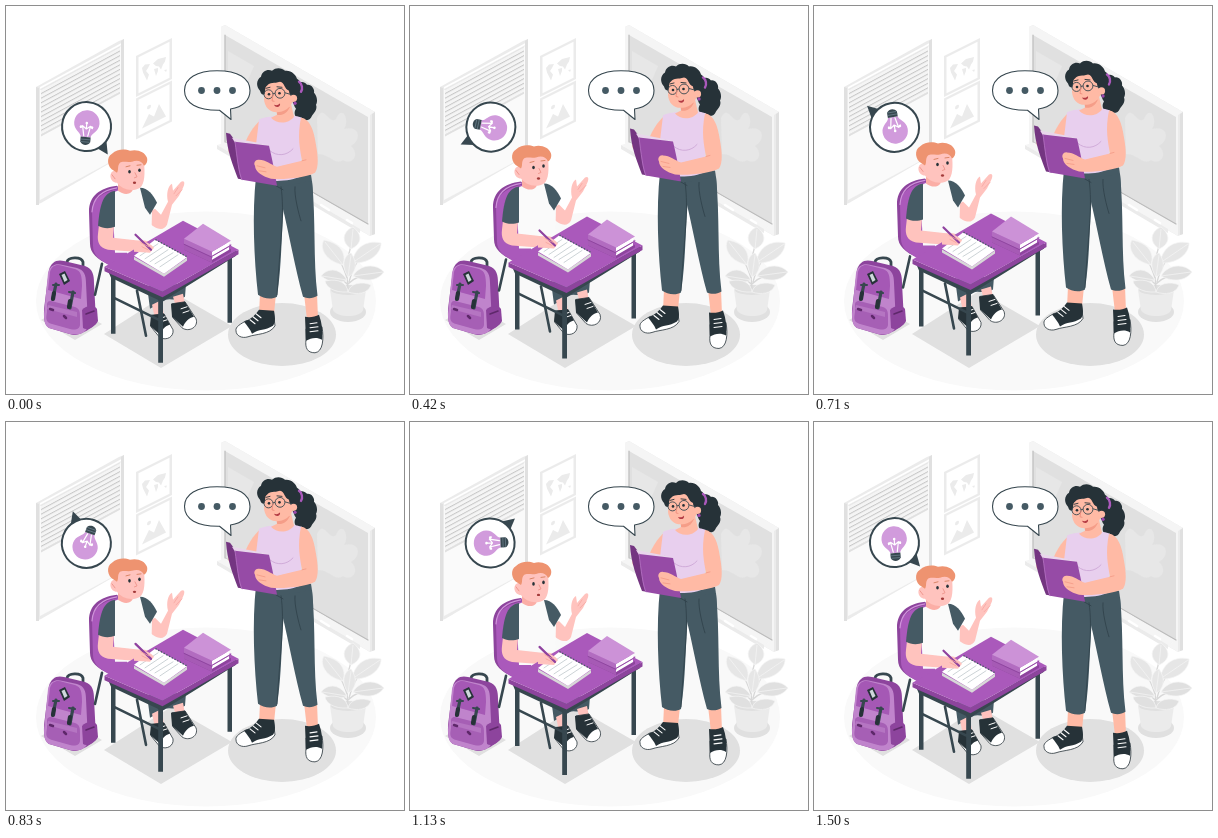
An HTML page for the animation above (1540 ms loop, 398 px wide and 388 px high).

```html
<!DOCTYPE html>
<html lang="en">
<head>
<meta charset="utf-8">
<title>Tutoring scene</title>
<style>
@property --p { syntax: "<number>"; inherits: true; initial-value: 0; }
html, body { margin: 0; width: 100%; height: 100%; overflow: hidden; background: #fff; }
svg { display: block; width: 398px; height: 388px; animation: tick 1540ms steps(37) -4ms infinite; }
@keyframes tick { from { --p: .0135; } to { --p: 1.0135; } }
.spin { transform: rotate(calc(360deg * var(--p))); }
.bob { transform: translateY(calc(-16px * min(var(--p), 1 - var(--p)))); }
.line { fill: none; stroke-linecap: round; stroke-linejoin: round; }
.ink { fill: #263238; } .slate { fill: #455a64; } .white { fill: #fff; }
.purple { fill: #aa59bb; } .deep { fill: #8d449d; } .lilac { fill: #cc92d7; }
.tan { fill: #ffbaa5; } .pink { fill: #ffc3be; }
.g1 { fill: #f5f5f5; } .g2 { fill: #ebebeb; } .g3 { fill: #e0e0e0; }
</style>
</head>
<body>
<svg viewBox="0 0 398 388">
<defs>
  <pattern id="slats" width="82" height="4.600" patternUnits="userSpaceOnUse">
    <path class="g1" d="M0 0H82V5H0z"/><path fill="#c8c8c8" d="M0 0H82V1.200H0z"/>
  </pattern>
  <g id="sneaker">
    <path class="white" stroke="#263238" stroke-width=".8" d="M-20 13C-21 9-15 6-10 3L18 0 19 8C14 17 0 16-8 19-14 21-20 18-20 13z"/>
    <path class="ink" d="M-12 4C-4 1 0-4 3-8L18-7C19-2 20 4 17 8 9 13 3 11-4 16-6 11-9 8-12 4z"/>
    <path class="line" stroke="#fff" stroke-width="1.100" d="M-6 2L-1 6M-3-1L2 3M0-4L5 0"/>
  </g>
</defs>

<ellipse cx="200" cy="295" rx="170" ry="89.500" fill="#f9f9f9"/>

<!-- window -->
<path class="g2" d="M30 81L113 35 118 33V149L35 197 30 199z"/>
<path class="g3" d="M30 81L33 82V199L30 199zM115 35L118 33V149L115 150z"/>
<g transform="matrix(1 -.54 0 1 34 83)">
  <path fill="#fafafa" d="M0 1H81V111H0z"/>
  <path fill="url(#slats)" d="M1 1H80V46H1z"/>
  <path class="g3" d="M1 46H80V48H1z"/>
  <path class="white" d="M0-2H81V0H0z"/>
</g>

<!-- pictures -->
<g transform="matrix(1 -.5 0 1 130 50)">
  <path class="g2" d="M0 0H36V41H0z"/><path class="white" d="M2.500 2.500H33.500V38.500H2.500z"/>
  <path class="g2" d="M6 15L9 13 14 15 12 18 10 20 13 25 11 30 9 25 7 20zM17 16L22 14 30 16 29 20 27 22 25 26 23 22 20 20zM18 22L22 23 22 26 20 30zM28 28L31 29 30 31z"/>
</g>
<g transform="matrix(1 -.5 0 1 130 92.500)">
  <path class="g2" d="M0 0H36V41H0z"/><path class="white" d="M2.500 2.500H33.500V38.500H2.500z"/>
  <path class="g2" d="M6 33L13 22 18 27 23 17 30 33z"/><circle class="g2" cx="13" cy="15" r="2"/>
</g>

<!-- board -->
<path class="g2" d="M215 21L219 19 369 106V228L364 230 215 144z"/>
<path class="g1" d="M215 21L219 19 369 106 364 109V230L215 144z"/>
<path fill="#e0e0e0" d="M219 29L362 111V218L219 136z"/>
<path fill="#e7e7e7" d="M311 112C318 97 323 120 330 113 337 97 344 116 338 123 354 119 356 134 345 140 355 149 345 160 337 154 329 160 324 148 312 148zM222 45L248 60 239 81 229 73 222 83z"/>
<path class="line" stroke="#bcbcbc" stroke-width="1.200" d="M219 29V136L362 218"/>
<path class="g3" d="M366 108L369 106V228L366 229z"/>
<path class="g1" d="M211 139L220 136.500 361 219 354 223z"/>
<path class="g2" d="M211 139L354 223V227L211 143z"/>
<path class="line" stroke="#fff" stroke-width="2.500" d="M315 199L323 204M341 214L346 217"/>

<!-- plant -->
<ellipse class="g3" cx="342" cy="306" rx="18" ry="10"/>
<path class="g2" d="M324 284C324 277 360 277 360 284L357 304C354 312 331 312 327 304z"/>
<ellipse class="g3" cx="342" cy="284" rx="17" ry="5"/>
<path class="line" stroke="#d8d8d8" stroke-width="1.300" d="M342 284Q339 257 346 236M341 272Q333 248 323 242M343 276Q350 250 366 242M342 278Q354 267 369 267M341 278Q331 267 321 268"/>
<g fill="#e6e6e6" stroke="#f5f5f5" stroke-width=".7">
  <path d="M345 243C333 234 339 224 347 221 357 229 356 238 345 243zM345 243L347 223"/>
  <path d="M337 259C316 254 314 239 318 234 334 237 341 247 337 259zM337 259L319 236"/>
  <path d="M346 257C349 239 363 234 375 237 375 250 360 258 346 257zM346 257L374 238"/>
  <path class="g3" d="M347 270C354 258 370 257 378 266 370 277 356 275 347 270zM347 270L377 266"/>
  <path class="g3" d="M341 274C334 262 322 261 315 270 324 277 333 278 341 274zM341 274L316 270"/>
  <path d="M342 271C334 258 339 249 345 247 352 257 350 267 342 271zM342 271L345 249"/>
  <path class="g3" d="M342 286C328 287 320 281 319 275 333 272 341 277 342 286zM342 286C344 277 356 275 365 279 362 288 351 289 342 286z"/>
</g>

<!-- floor shadows -->
<ellipse class="g3" cx="276" cy="328.500" rx="54" ry="31.500"/>
<path class="g3" d="M98 328L165 285 226 320 155 362z"/>
<path class="g3" d="M35 314L62 299 96 318 69 334z"/>

<!-- backpack -->
<g>
  <path class="line" stroke="#37474f" stroke-width="2.800" d="M61 262V256C62 251 75 250 77 256V263"/>
  <path class="deep" d="M43 264C45 256 51 253 58 255L79 260C87 263 88 269 88 277L90 315C90 321 73 330 67 329L43 322C37 318 38 309 38 303z"/>
  <path fill="#c084cc" d="M42 267C44 259 50 257 57 259L71 262C78 264 80 269 80 277L82 318C82 327 72 330 64 328L43 322C39 320 38 315 38 308z"/>
  <path fill="#a558b5" d="M44 266C46 259 51 258 57 260L69 263C75 265 76 270 76 280L75 293 42 284z"/>
  <path fill="#a65fb5" d="M41 298C42 294 45 295 49 296L69 301C74 303 74 306 74 312V319C73 324 69 324 64 323L46 318C39 316 40 312 41 306z"/>
  <path fill="#b575c2" d="M42 299L71 306V311L41 303z"/>
  <path class="deep" d="M76 304C80 299 89 299 91 303L92 315C89 321 81 325 77 322z"/>
  <path class="line" stroke="#37474f" stroke-width="3.200" d="M50 278L47 292M67 286L64 302"/>
  <path class="line" stroke="#263238" stroke-width="4.200" d="M48 287L47 293M64 295L63 301"/>
  <path class="line" stroke="#37474f" stroke-width="2" d="M47 279L53 279M63 286L69 287"/>
  <path class="line" stroke="#5e286a" stroke-width="1.600" d="M80 308L88 305"/>
  <path class="ink" d="M53 268L59 265 64 275 58 279z"/><path fill="#cfd8dc" d="M55.500 269L58.500 267.500 61.500 274 58.500 276z"/>
  <path class="line" stroke="#5e286a" stroke-width="2.500" d="M44 303L47 304M58 310L60 312"/>
</g>

<!-- speech bubble -->
<path class="white" stroke="#37474f" stroke-width="1.100" stroke-linejoin="round" d="M211 64.700C232 64.700 244 72 244 84.500 244 94 237 101 224.500 103L225 113.500 213.500 104.200C191 104.500 178.500 97 178.500 84.500 178.500 72 191 64.700 211 64.700z"/>
<g class="slate"><circle cx="195.500" cy="84.500" r="3.400"/><circle cx="211" cy="84.500" r="3.400"/><circle cx="226.500" cy="84.500" r="3.400"/></g>

<!-- idea bubble -->
<g transform="translate(80.500 121)"><g class="spin">
  <path fill="#37474f" d="M12 20L23.500 25.500 21 12z"/>
  <circle class="white" cy="-.4" r="24.500" stroke="#37474f" stroke-width="2"/>
  <path fill="#d19bdc" d="M-5 10C-5 6-12.700 4-12.700-4A12.700 12.700 0 0 1 12.700-4C12.700 4 5 6 5 10z"/>
  <path class="line" stroke="#fff" stroke-width="1.200" d="M-2 9L-4-1M2 9L4-1M-6 1L-4-1 0 2 4-1 6 1M0 2V-4"/>
  <g class="white"><circle cx="-5.500" cy="0" r="1.300"/><circle cx="5.500" cy="0" r="1.300"/><circle cy="-4" r="1.300"/></g>
  <path fill="#37474f" d="M-5 10H5V15C3 19-3 19-5 15z"/>
  <path stroke="#78909c" stroke-width=".6" d="M-5 12.500H5M-4.500 15H4.500"/>
</g></g>

<!-- boy at the desk -->
<g class="bob">
  <path class="line" stroke="#37474f" stroke-width="2.600" d="M96 258L89 289M131 285L140 330"/>
  <path class="deep" d="M83 206C83 190 94 182 111 180L117 187 103 200 104 259C91 254 84 247 84 238z"/>
  <path class="purple" d="M86 207C86 193 97 186 114 183L121 191V251L104 260C93 254 87 249 87 240z"/>
  <path class="line" stroke="#cf93da" stroke-width="1.200" d="M86 206C87 191 98 184 111 182"/>

  <path class="slate" d="M141 280L180 278 179 291C172 296 164 292 160 294L144 303z"/>
  <path class="pink" d="M146 299L156 294 158 311 149 313zM167 291L177 288 179 299 170 301z"/>
  <g>
    <path class="white" stroke="#263238" stroke-width=".8" d="M146 310L158 308 167 324C168 331 161 335 154 332L145 321z"/>
    <path class="ink" d="M145 309L158 308 164 319C159 320 156 324 154 329L144 320z"/>
    <path class="white" stroke="#263238" stroke-width=".8" d="M166 298L179 296 190 313C193 321 183 327 176 322L167 312z"/>
    <path class="ink" d="M165 298L179 296 188 311C183 312 179 316 177 321L166 311z"/>
    <path class="line" stroke="#fff" d="M153 313L159 311M155 316L161 314M175 303L181 301M177 307L183 305"/>
  </g>

  <path class="pink" d="M142 207L149 203 155 209 162 196C160 188 162 180 166 178L167 185 175 176C179 174 179 178 177 182L173 190 166 199 161 219C158 225 151 225 142 216z"/>
  <path class="line" stroke="#f5a39c" stroke-width=".7" d="M168 188L172 182M170 190L176 184"/>
  <path fill="#fafafa" d="M106 188C115 181 130 181 138 183L146 206 145 247 109 247z"/>
  <path class="slate" d="M134 182C142 182 147 189 151 197L144 209 139 202z"/>
  <path class="pink" d="M93 219L108 219 107 232 134 235C141 234 147 237 148 241 145 248 137 247 129 246L102 244C93 242 91 236 92 228z"/>
  <path class="slate" d="M109 185C98 187 94 196 92 220 97 223 104 223 109 221z"/>

  <path fill="#fbaea6" d="M112 176L127 182C127 189 118 190 112 185z"/>
  <path class="pink" d="M109 157C116 150 134 151 138 157 139 167 139 178 134 182 126 187 115 183 111 177 104 177 102 167 108 165z"/>
  <path fill="#ee9370" d="M111 167L108 165C101 162 100 151 106 148 111 143 119 143 124 145 131 143 139 146 141 152 142 156 140 159 138 160 136 155 131 154 126 156 121 157 117 155 114 157 111 160 113 164 111 167z"/>
  <g class="ink"><ellipse cx="123.500" cy="166" rx="1.300" ry="1.800"/><ellipse cx="133.500" cy="164.500" rx="1.300" ry="1.800"/></g>
  <path class="line" stroke="#d67f5f" stroke-width=".9" d="M120 161L124 160M131 159.500L135 159"/>
  <path class="line" stroke="#ee938b" stroke-width=".9" d="M129 167L131 171 128.500 172M106 169L109 173"/>
  <ellipse cx="128.500" cy="177" rx="1.600" ry="1.200" fill="#a33a3a"/>

  <path class="line" stroke="#37474f" stroke-width="2.500" d="M108 292L155 315"/>
  <path fill="#37474f" d="M102 265L156 288 230 244V250L156 296 105 272z"/>
  <path fill="#37474f" d="M105 267H109.500V328H105zM221.500 252H226V317H221.500zM152.200 288H157V357H152.200z"/>
  <path class="deep" d="M98.500 261L156.500 286 232.500 244V248.500L156.500 291.500 98.500 265.500z"/>
  <path class="purple" d="M98.500 261L177 215 232.500 244 156.500 286z"/>

  <path fill="#d8d8d8" d="M128 251L158 268 181 252V255L158 271 128 254z"/>
  <path class="white" d="M128 250L149 234 181 251.500 158 268z"/>
  <path class="line" stroke="#a9b5ba" stroke-width=".6" d="M134 250L152 238M139 253L157 241M144 256L162 244M149 258L167 247M154 261L172 249"/>
  <path class="line" stroke="#455a64" stroke-width="1.500" stroke-dasharray=".1 3" d="M150 234L181 251"/>
  <path class="pink" d="M128 236C135 233 144 237 148 242L144 247 128 246z"/>
  <path class="line" stroke="#8f429f" stroke-width="2.200" d="M129.500 229L145 244"/>
  <path class="line" stroke="#f5a39c" stroke-width=".8" d="M135 237L143 241M136 241L142 244"/>

  <path class="deep" d="M178 241L206 254 225 243V246L206 257 178 244z"/>
  <path class="white" d="M206 250L223 240V244L206 254z"/>
  <path fill="#a65ab5" d="M178 238L206 251V257L178 244z"/>
  <path class="lilac" d="M206 249L225 238V240L206 251z"/>
  <path class="white" d="M206 246L223 236V240L206 250z"/>
  <path fill="#b26cc0" d="M178 233L206 246V251L178 238z"/>
  <path class="lilac" d="M178 233L197 218 225 235 206 246z"/>
  <path class="line" stroke="#8d449d" stroke-width=".9" d="M206 250.500L225 239.500M178 238.500L206 251.500"/>
</g>

<!-- teacher -->
<g class="bob">
  <path class="ink" d="M289 84C291 76 297 74 301 79 305 78 309 83 308 87 311 90 312 96 310 99 312 104 307 108 306 110 304 116 297 115 295 112 289 114 287 107 290 103 286 98 287 90 289 84z"/>
  <path class="tan" d="M254 288L270 288 268 308 253 309zM298 288L311 288 312 313 301 314z"/>
  <use href="#sneaker" x="250" y="312"/>
  <path class="white" stroke="#263238" stroke-width=".8" d="M300 323L316 321C318 333 317 346 309 347 301 347 299 342 300 334z"/>
  <path class="ink" d="M299 311C304 312 309 311 313 309 316 317 317 326 316 334 311 331 305 332 300 335z"/>
  <path class="line" stroke="#fff" stroke-width="1.100" d="M304 318L311 317M304 322L312 321M304 326L312 325"/>

  <path class="slate" d="M250 171L305 169C307 181 307 189 307 201L299 205 278 198C275 231 276 258 271 291 266 294 257 293 252 289 248 253 246 207 250 171z"/>
  <path class="slate" d="M274 181L306 175C310 216 307 253 311.500 290 307 293 301 293 297 291 289 262 283 228 276 199z"/>
  <path class="line" stroke="#2f4149" stroke-width=".8" d="M275 181C279 207 274 237 271 289M270 180L277 184M289 181C288 190 293 209 295 215"/>

  <path class="tan" d="M255 114C248 119 240 132 236 145L246 152 258 139z"/>
  <path fill="#e8cfee" d="M253 114C259 110 287 108 296 112L297 143C293 153 296 164 296 170 283 177 261 176 250 172 254 159 252 146 250 139z"/>
  <path class="line" stroke="#cda8d6" stroke-width=".9" d="M264 145C271 151 281 150 287 143M255 138L260 144"/>
  <path class="tan" d="M269 99L285 98 288 111C282 119 270 118 265 112L271 109z"/>
  <path fill="#f59d88" d="M271 104L284 101C281 108 276 110 271 109z"/>
  <path class="tan" d="M259 77C265 69 282 70 288 78 291 91 286 103 275 106 264 108 259 102 258 94z"/>
  <path class="ink" d="M254 85C250 81 250 74 255 71 256 65 262 63 266 65 270 61 276 62 279 65 285 64 290 69 291 73 296 76 296 83 293 87 292 93 290 97 287 98 287 92 283 89 283 85 278 83 279 77 274 76 268 78 264 76 261 80 258 82 260 86 258 89 256 89 255 88 254 85z"/>
  <circle class="tan" cx="287.500" cy="92.500" r="3.600"/>
  <circle cx="289" cy="97.500" r="1.700" fill="#9a48aa"/>
  <path class="line" stroke="#aa59bb" stroke-width="2.400" d="M293 76C296 78 297 83 295 86"/>
  <g fill="none" stroke="#37474f" stroke-width=".9"><circle cx="262.500" cy="88.500" r="4.500"/><circle cx="274" cy="87.500" r="4.900"/><path d="M267 88L269 87.500M279 87L286 89"/></g>
  <g class="ink"><circle cx="263" cy="88.500" r="1.300"/><circle cx="273.500" cy="87.500" r="1.300"/></g>
  <path class="line" stroke="#263238" stroke-width=".9" d="M260 82.500L264 81.500M271 81L276 81.500"/>
  <path class="line" stroke="#ee8e7d" stroke-width=".9" d="M267 89L266 95 268 95.500"/>
  <path fill="#b33a43" d="M268 99C271 100 273 99 274 97.500 275 101 270 103 268 99z"/>

  <path class="tan" d="M226 138C222 139 221 146 224 148L235 154 234 139z"/>
  <path fill="#743581" d="M220 127L224 128 230 136 238 174 232 173C227 160 221 145 220 127z"/>
  <path fill="#e9d6ec" d="M226 132L262 139 264 142 229 137z"/>
  <path fill="#964ba6" d="M229 136L263 140C266 152 269 168 271 180L236 174C233 172 231 151 229 136z"/>
  <path class="line" stroke="#b774c4" stroke-width=".8" d="M229 136C231 151 233 169 236 174"/>
  <path class="tan" d="M295 112C304 113 308 125 310 139 312 150 313 162 309 167 300 172 279 174 265 173 257 171 249 166 249 160 247 157 250 153 253 154 260 154 265 159 271 161L296 155C294 144 291 131 295 112z"/>
  <path class="line" stroke="#f39a86" stroke-width=".8" d="M251 160L259 162M253 165L260 166M296 155L300 154"/>
</g>
</svg>
</body>
</html>
```
